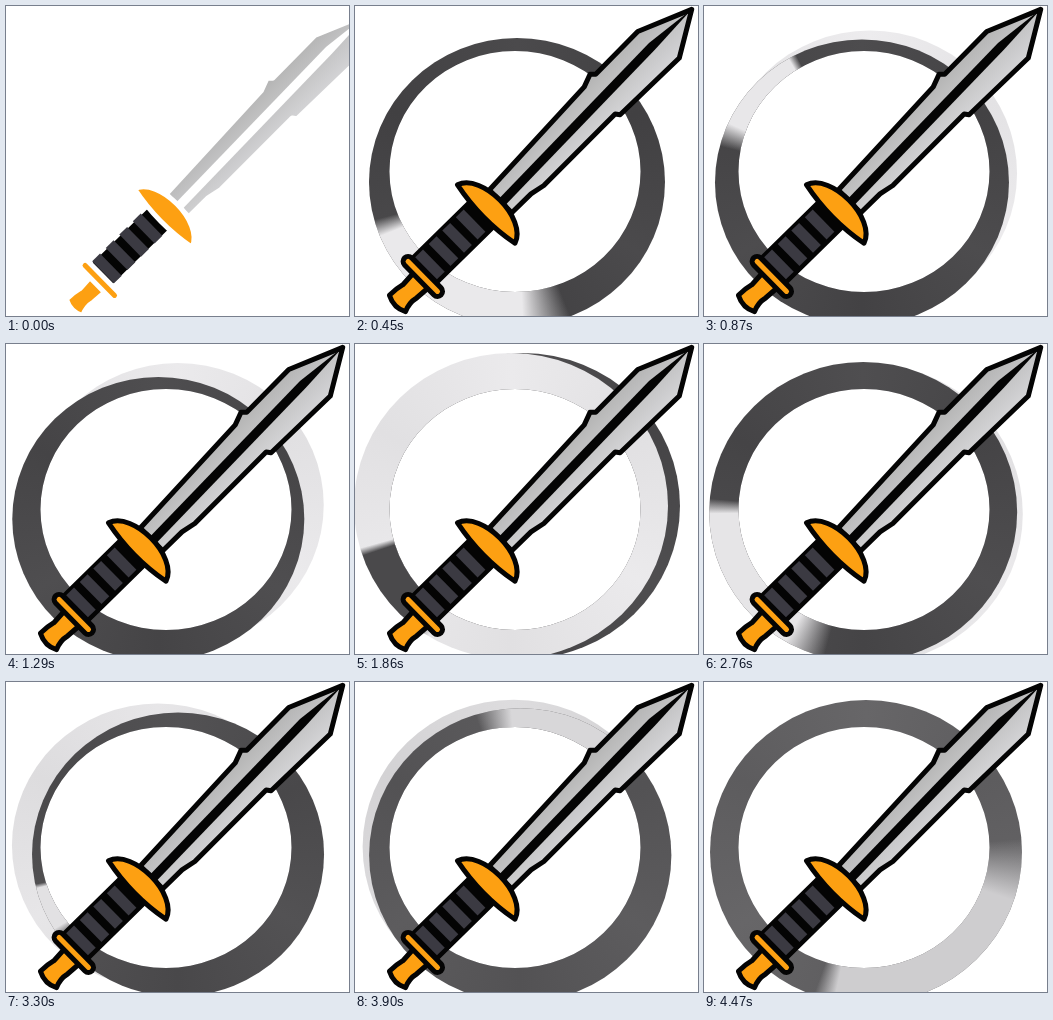
These frames come from a looping animation (343x310 px, 4.5 s). An HTML page with a canvas:

```html
<!DOCTYPE html>
<html lang="en">
<head>
<meta charset="utf-8">
<title>Sword and ring</title>
<style>
html, body { margin: 0; width: 100%; height: 100%; overflow: hidden; background: #fff; }
canvas { display: block; }
</style>
</head>
<body>
<canvas id="stage" width="343" height="310"></canvas>
<script>
const ctx = document.getElementById('stage').getContext('2d');
const LOOP = 4500, INTRO = 30, RAD = Math.PI / 180;
const ORANGE = '#fda012', GRIP = '#3b3a42', INK = '#040404';

// The ring is two discs pushed apart along tilt by gap, plus a contrasting sweep.
const POSES = [
  { t: 450, y: 176, r: 148, tilt: 300, gap: 0, tone: 70, from: 68, span: 97 },
  { t: 1290, y: 168, r: 146, tilt: 324, gap: 12, tone: 74, from: 320, span: 0 },
  { t: 1860, y: 162, r: 157, tilt: 0, gap: 6, tone: 230, from: 122, span: 42 },
  { t: 2760, y: 169, r: 154, tilt: 20, gap: 3, tone: 74, from: 105, span: 80 },
  { t: 3300, y: 168, r: 146, tilt: 204, gap: 11, tone: 78, from: 144, span: 24 },
  { t: 4470, y: 170, r: 156, tilt: 260, gap: 0, tone: 98, from: 355, span: 115 }
];

// Sword parts: x runs from pommel to tip, y across the blade.
const part = d => new Path2D(d);
const blade = part('M409 0L355-22L295-21L291-25L278-20L138-13V19H165L180 22L281 21L284 25L366 26Z');
const groove = part('M138 0L355-6L409 0L355 3L138 9Z');
const grip = part('M28-18H118V16H28Z');
const pommel = part('M26-7L10-6Q2-8-7-8Q-13 4-7 15Q2 11 10 13L26 14Z');
const collar = new Path2D();
collar.roundRect(25, -24, 10, 52, 5);
const guard = part('M119-39C145-30 145 34 119 43Q111 2 119-39Z');

function paint(path, fill, ink) {
  ctx.fillStyle = fill;
  ctx.fill(path);
  ctx.strokeStyle = ink;
  ctx.lineWidth = 5;
  ctx.lineJoin = 'round';
  ctx.stroke(path);
}

function drawSword(x, y, ink) {
  ctx.save();
  ctx.translate(x, y);
  ctx.rotate(-44.5 * RAD);
  const steel = ctx.createLinearGradient(0, -20, 0, 22);
  steel.addColorStop(0, '#b6b6b6');
  steel.addColorStop(1, '#d2d2d4');
  paint(blade, steel, ink);
  ctx.fillStyle = ink;
  ctx.fill(groove);
  paint(grip, INK, ink);
  ctx.fillStyle = GRIP;
  for (let i = 0; i < 4; i++) ctx.fillRect(38 + 19 * i, -17, 11, 31);
  for (const p of [pommel, collar, guard]) paint(p, ORANGE, ink);
  ctx.restore();
}

const mod = (v, n) => (v % n + n) % n;

function poseAt(t) {
  const next = POSES.findIndex(p => p.t > t);
  const b = POSES[Math.max(next, 0)];
  const a = POSES[mod(POSES.indexOf(b) - 1, POSES.length)];
  const u = mod(t - a.t, LOOP) / mod(b.t - a.t, LOOP);
  const ease = key => a[key] + (b[key] - a[key]) * u;
  const turn = key => (a[key] + mod(b[key] - a[key], 360) * u) * RAD;
  return {
    y: ease('y'), r: ease('r'), gap: ease('gap'), tone: ease('tone'),
    span: ease('span'), tilt: turn('tilt'), from: turn('from')
  };
}

const grey = (v, alpha = 1) => `rgba(${v},${v - 1},${v + 1},${alpha})`;

function disc(x, y, r, fill) {
  ctx.beginPath();
  ctx.ellipse(x, y, r, r - 4, 0, 0, Math.PI * 2);
  ctx.fillStyle = fill;
  ctx.fill();
}

// Uneven smoky tone around the band.
function smoke(x, y, tone) {
  const g = ctx.createConicGradient(0, x, y);
  for (let i = 0; i <= 12; i++) g.addColorStop(i / 12, grey(tone + 5 * Math.sin(i * 90 * RAD)));
  return g;
}

function sweep(x, y, from, span, tone) {
  const g = ctx.createConicGradient(from, x, y), end = span / 360;
  g.addColorStop(0, grey(tone, 0));
  g.addColorStop(end * 0.2, grey(tone));
  g.addColorStop(end * 0.93, grey(tone));
  g.addColorStop(end, grey(tone, 0));
  return g;
}

function drawRing(t) {
  const { y, r, tilt, gap, tone, from, span } = poseAt(t);
  const cx = 162, dx = gap * Math.cos(tilt), dy = gap * Math.sin(tilt);
  const fx = cx - dx, fy = y - dy, contrast = 304 - tone;
  ctx.save();
  ctx.beginPath();
  ctx.rect(0, 0, 343, 310);
  ctx.ellipse(160, 165.5, 125.5, 120.5, 0, 0, Math.PI * 2);
  ctx.clip('evenodd');
  if (gap > 0.1) disc(cx + dx, y + dy, r, smoke(cx + dx, y + dy, contrast));
  disc(fx, fy, r, smoke(fx, fy, tone));
  if (span > 1) disc(fx, fy, r, sweep(fx, fy, from, span, contrast));
  ctx.restore();
}

function frame() {
  const t = performance.now() % LOOP;
  ctx.fillStyle = '#fff';
  ctx.fillRect(0, 0, 343, 310);
  if (t < INTRO) {
    drawSword(71, 294, '#fff');
  } else {
    drawRing(t);
    drawSword(45, 290, INK);
  }
  requestAnimationFrame(frame);
}
frame();
</script>
</body>
</html>
```
